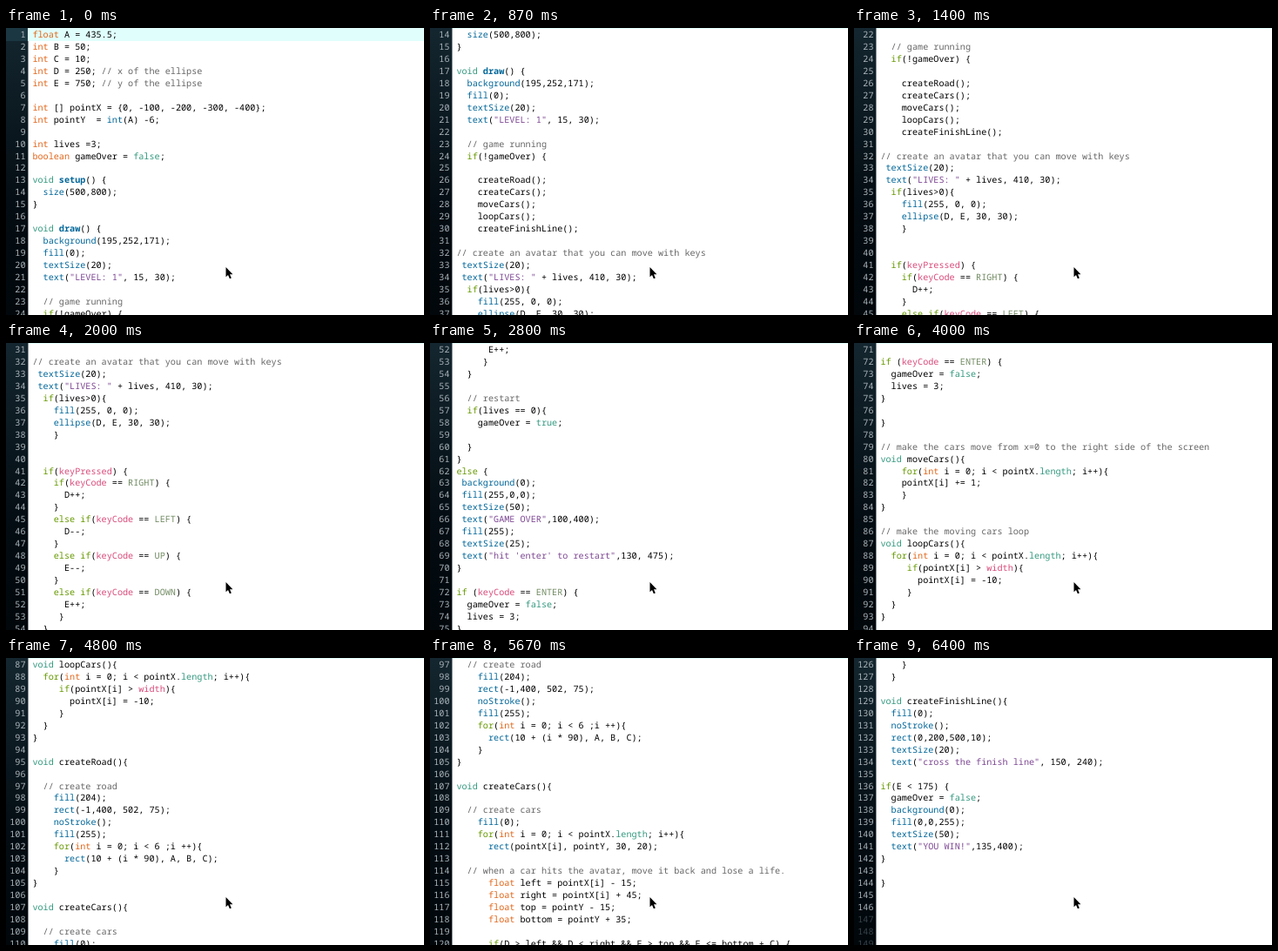
These frames come from a looping animation (480 px wide and 330 px high, 6590 ms). An HTML page:

```html
<!DOCTYPE html>
<html lang="en">
<head>
<meta charset="utf-8">
<title>Code scroll</title>
<style>
  html, body { margin: 0; width: 100%; height: 100%; overflow: hidden; background: #fff; }
  #stage {
    position: relative; width: 480px; height: 330px; overflow: hidden; background: #fff;
    font: 10.17px/14px "Noto Sans Mono", "DejaVu Sans Mono", monospace;
    font-variant-ligatures: none; text-rendering: geometricPrecision; color: #000;
  }
  #gutter {
    position: absolute; inset: 0 auto 0 0; width: 25px; border-right: 1px solid #8a9498;
    background: linear-gradient(#14262f, #040d13 60%, #01070b);
  }
  #edge { position: absolute; left: 26px; right: 0; top: 0; height: 1px; background: #e0fffc; }
  .row { position: absolute; left: 0; width: 480px; height: 15px; white-space: pre; }
  .row.active { background: linear-gradient(90deg, #1b3742 25px, #e0fffc 25px); }
  .num { position: absolute; right: 457.5px; color: #a9b3b9; }
  .num.past { color: #38434a; }
  .src { position: absolute; left: 30.4px; }
  #caret { position: absolute; left: 30px; top: 1px; width: 1px; height: 13px; background: #333; }
  #mouse { position: absolute; left: 250px; top: 273px; }
  .comment { color: #666; }
  .string { color: #7d4793; }
  .type { color: #e2661a; }
  .word { color: #33997e; }
  .flow { color: #690; }
  .call { color: #069; }
  .event { color: #069; font-weight: bold; }
  .sys { color: #d94a7a; }
  .key { color: #718a62; }
</style>
</head>
<body>
<div id="stage">
  <div id="gutter"></div>
  <div id="edge"></div>
  <div id="rows"></div>
  <div id="caret"></div>
  <svg id="mouse" width="14" height="20" viewBox="0 0 14 20">
    <path d="M2.5 2V13.2L5 10.9L6.9 15.3L8.8 14.5L7 10.2H10.4Z" fill="#000" stroke="#fff" stroke-width="1.4" paint-order="stroke"/>
  </svg>
</div>
<script type="text/plain" id="code">float A = 435.5;
int B = 50;
int C = 10;
int D = 250; // x of the ellipse
int E = 750; // y of the ellipse

int [] pointX = {0, -100, -200, -300, -400};
int pointY  = int(A) -6;

int lives =3;
boolean gameOver = false;

void setup() {
  size(500,800);
}

void draw() {
  background(195,252,171);
  fill(0);
  textSize(20);
  text("LEVEL: 1", 15, 30);

  // game running
  if(!gameOver) {

    createRoad();
    createCars();
    moveCars();
    loopCars();
    createFinishLine();

// create an avatar that you can move with keys
 textSize(20);
 text("LIVES: " + lives, 410, 30);
  if(lives>0){
    fill(255, 0, 0);
    ellipse(D, E, 30, 30);
    }


  if(keyPressed) {
    if(keyCode == RIGHT) {
      D++;
    }
    else if(keyCode == LEFT) {
      D--;
    }
    else if(keyCode == UP) {
      E--;
    }
    else if(keyCode == DOWN) {
      E++;
     }
  }

  // restart
  if(lives == 0){
    gameOver = true;

  }
}
else {
 background(0);
 fill(255,0,0);
 textSize(50);
 text("GAME OVER",100,400);
 fill(255);
 textSize(25);
 text("hit 'enter' to restart",130, 475);
}

if (keyCode == ENTER) {
  gameOver = false;
  lives = 3;
}

}

// make the cars move from x=0 to the right side of the screen
void moveCars(){
    for(int i = 0; i < pointX.length; i++){
    pointX[i] += 1;
    }
}

// make the moving cars loop
void loopCars(){
  for(int i = 0; i < pointX.length; i++){
     if(pointX[i] > width){
       pointX[i] = -10;
     }
  }
}

void createRoad(){

  // create road
    fill(204);
    rect(-1,400, 502, 75);
    noStroke();
    fill(255);
    for(int i = 0; i < 6 ;i ++){
      rect(10 + (i * 90), A, B, C);
    }
}

void createCars(){

  // create cars
    fill(0);
    for(int i = 0; i < pointX.length; i++){
      rect(pointX[i], pointY, 30, 20);

  // when a car hits the avatar, move it back and lose a life.
      float left = pointX[i] - 15;
      float right = pointX[i] + 45;
      float top = pointY - 15;
      float bottom = pointY + 35;

      if(D > left && D < right && E > top && E <= bottom + C) {
        lives--;
        D = 250;
        E = 750;
      }

    }
  }

void createFinishLine(){
  fill(0);
  noStroke();
  rect(0,200,500,10);
  textSize(20);
  text("cross the finish line", 150, 240);

if(E < 175) {
  gameOver = false;
  background(0);
  fill(0,0,255);
  textSize(50);
  text("YOU WIN!",135,400);
}

}

</script>
<script>
  const LOOP = 6590, PITCH = 13.95, ROWS = 24;
  const $ = id => document.getElementById(id);

  const rules = {
    comment: '\\/\\/.*',
    string: '"[^"]*"',
    call: '\\b(?:int(?=\\()|size|background|fill|textSize|text|ellipse|rect|noStroke)\\b',
    type: '\\b(?:float|int|boolean)\\b',
    word: '\\b(?:void|true|false|length)\\b',
    flow: '\\b(?:if|else|for)\\b',
    event: '\\b(?:setup|draw)\\b',
    sys: '\\b(?:keyPressed|keyCode|width)\\b',
    key: '\\b(?:RIGHT|LEFT|UP|DOWN|ENTER)\\b'
  };
  const names = Object.keys(rules);
  const lexer = new RegExp(names.map(n => `(${rules[n]})`).join('|') + '|([&<>])', 'g');
  const escapes = { '&': '&amp;', '<': '&lt;', '>': '&gt;' };

  const paint = line => line.replace(lexer, (token, ...groups) => {
    const name = names[groups.findIndex(g => g !== undefined)];
    return name ? `<span class="${name}">${token}</span>` : escapes[token];
  });
  const lines = $('code').textContent.split('\n').map(paint);

  // Lines scrolled per tick (15 ticks a second), one string per swipe or rest.
  const steps = [
    '0'.repeat(8),
    '123322' + '1'.repeat(17) + '0',
    '12332222211' + '11111111101' + '00',
    '12222' + '22121' + '2' + '1'.repeat(15) + '000',
    '123443333211'
  ].join('');
  let sum = 0;
  const tops = [...steps].map(n => sum += +n);

  const rows = Array.from({ length: ROWS }, (_, i) => {
    const row = document.createElement('div');
    row.className = 'row';
    row.style.top = i * PITCH + 'px';
    row.innerHTML = '<span class="num"></span><span class="src"></span>';
    $('rows').append(row);
    return row;
  });

  let shown = -1;
  function show(top) {
    if (top === shown) return;
    shown = top;
    rows.forEach((row, i) => {
      const n = top + i, [num, src] = row.children;
      row.classList.toggle('active', n === 0);
      num.textContent = n + 1;
      num.classList.toggle('past', n >= 146);
      src.innerHTML = lines[n] || '';
    });
  }

  const start = performance.now();
  function frame() {
    const t = (performance.now() - start) % LOOP;
    const tick = Math.floor(t * 0.015 + 0.06);
    const top = tops[Math.min(tick, tops.length - 1)];
    show(top);
    $('caret').style.display = t >= 270 && top === 0 ? 'block' : 'none';
    requestAnimationFrame(frame);
  }
  frame();
</script>
</body>
</html>
```
